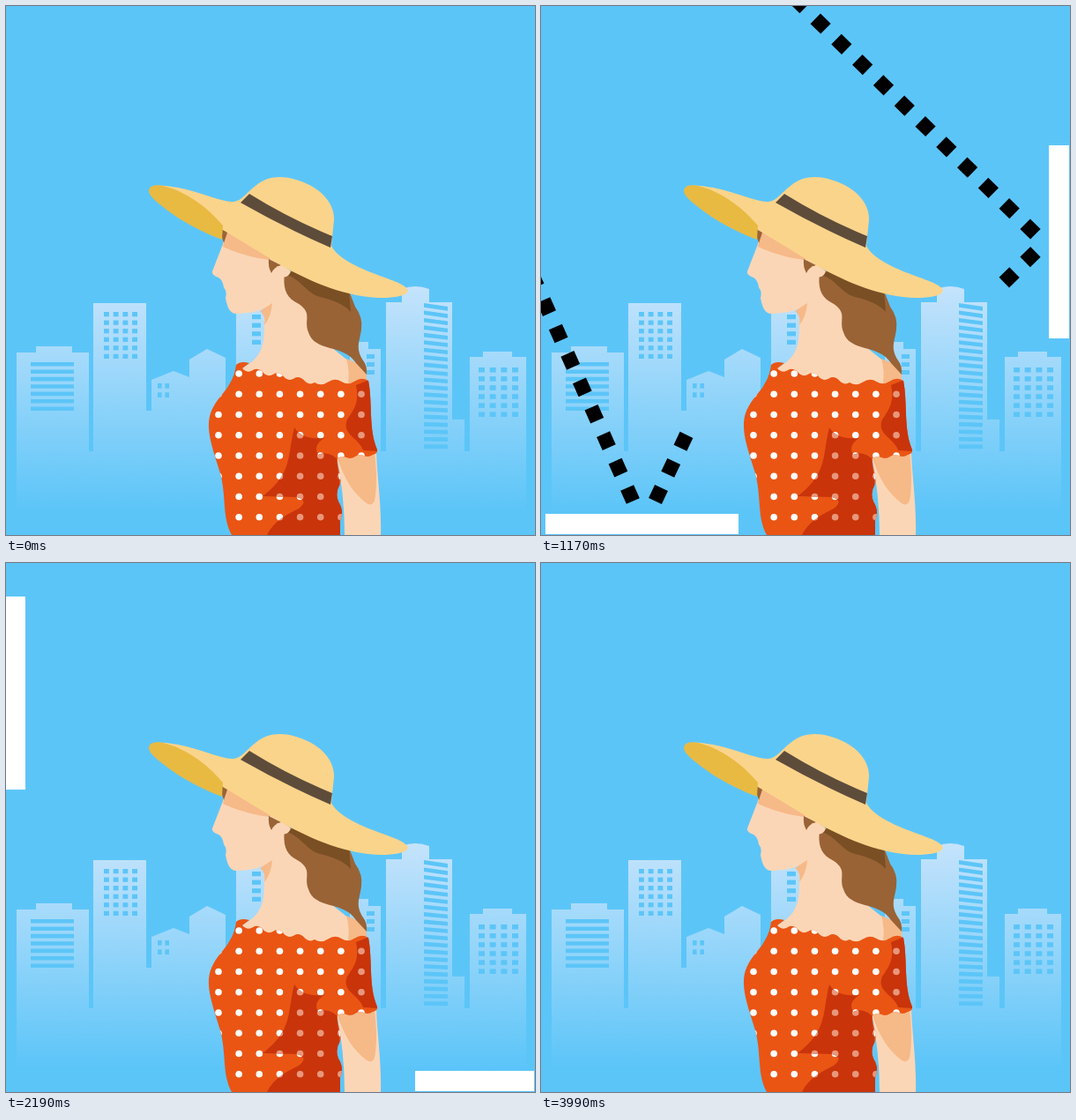
Write an HTML page that moves like this. It is 600 px wide and 600 px high and loops after 4.5 s.

```html
<!DOCTYPE html>
<html lang="en">
<head>
<meta charset="utf-8">
<title>Summer light</title>
<style>
html, body { margin: 0; width: 100%; height: 100%; overflow: hidden; background: #5cc5f8; }
svg { display: block; width: 100vw; height: 100vh; }
</style>
</head>
<body>
<svg viewBox="0 0 600 600" xmlns="http://www.w3.org/2000/svg">
  <defs>
    <linearGradient id="haze" gradientUnits="userSpaceOnUse" x1="0" y1="318" x2="0" y2="572">
      <stop offset="0" stop-color="#c5e3fc"/>
      <stop offset="1" stop-color="#5cc5f8"/>
    </linearGradient>
    <clipPath id="dressClip"><path id="dress"/></clipPath>
    <clipPath id="shadeClip">
      <path id="shade" d="M327 478 C334 490 348 491 361 490 C352 496 350 502 354 509 Q364 504 375 513 L385 600 H296 C303 585 318 577 332 570 Q344 561 330 557 L291 556 C326 530 319 508 327 478Z M397 430 L412 424 L421 505 L405 504 C401 490 380 486 387 469 C398 454 400 446 397 430Z"/>
    </clipPath>
  </defs>

  <rect width="600" height="600" fill="#5cc5f8"/>

  <g id="city">
    <path fill="url(#haze)" d="M12 572V393H34V386H75V393H94V505H99V337H159V459H165V424L190 414L208 421V401L228 389L249 399V505H261V330H300V505H390V381H411V389H425V505H431V336H449V321Q464 315 480 321V336H506V469H520V505H526V398H541V392H574V398H590V572Z"/>
    <g id="panes" fill="#5cc5f8"/>
  </g>

  <g id="woman">
    <path fill="#fbd6b6" d="M375 510 L420 506 C421 535 426 565 425 600 H384 Q384 555 375 510Z"/>
    <path fill="#f6b988" d="M375 510 L418 507 Q422 540 418 561 Q415 568 409 564 C394 553 383 536 375 510Z"/>
    <path fill="#fbd6b6" d="M248 250 L246 270 L234 301 Q233 305 241 308 Q246 311 247 319 Q251 324 249 331 C251 342 254 350 264 349 C276 348 284 347 292 343 C295 385 292 398 266 412 L275 440 H408 V418 L360 380 L322 300Z"/>
    <path fill="#f6b988" d="M250 254 L303 286 L298 288 Q270 284 246 273Z"/>
    <path fill="#996336" d="M245 249 L252 254 L247 269 Q243 259 245 249Z"/>
    <path fill="#f6b988" d="M302 337 L288 346 Q295 351 293 362 Q301 352 302 337Z"/>
    <path fill="#f6b988" d="M386 400 L409 410 V428 H388 Q390 414 386 400Z"/>
    <path fill="#996336" d="M316 303 C314 318 317 329 327 335 C350 347 337 355 343 370 C350 393 383 383 397 405 L409 418 Q410 408 405 402 C396 388 401 381 403 367 Q405 353 396 341 L389 323 L330 298Z"/>
    <path fill="#7a4f24" d="M318 305 C335 310 341 326 356 330 Q382 336 391 347 L389 323 L330 298Z"/>
    <path fill="#996336" d="M298 287 L312 294 Q304 296 301 303 Q297 296 298 287Z"/>
    <path fill="#fbd6b6" d="M307 295 L323 301 Q320 309 313 307Z"/>
    <path fill="#fad48b" d="M164 206 C169 202 188 204 208 209 C228 214 244 222 258 222 C268 221 273 211 283 204 C300 189 323 193 342 202 C363 212 373 228 372 243 L369 272 C377 288 405 299 427 307 C440 312 454 316 456 323 C454 329 440 331 426 331 C385 330 349 314 317 297 L246 254Z"/>
    <path fill="#e8ba42" d="M162 209 C163 203 172 202 182 205 C207 212 230 230 246 249 L245 265 C221 256 195 242 177 227 Q161 215 162 209Z"/>
    <path fill="#5e4c3b" d="M266 223 L276 213 Q321 241 370 261 L368 274 Q317 252 266 223Z"/>
    <use href="#dress" fill="#ea5514"/>
    <g id="dots" fill="#fff" clip-path="url(#dressClip)"/>
    <g clip-path="url(#dressClip)">
      <use href="#shade" fill="#c9340b"/>
      <g id="dimDots" fill="#e8977b" clip-path="url(#shadeClip)"/>
    </g>
  </g>

  <g id="first">
    <path fill="#fff" d="M576 158H599V377H576Z M5 576H224V599H5Z"/>
  </g>
  <g id="second">
    <path fill="#fff" d="M0 38H22V257H0Z M464 576H599V599H464Z"/>
  </g>
</svg>
<script>
const LOOP = 4500, TICK = 30;
const STEP = 82;      // ms between marks
const PITCH = 33.3;   // distance between marks
const $ = id => document.getElementById(id);

function add(parent, tag, attrs) {
  const el = document.createElementNS("http://www.w3.org/2000/svg", tag);
  for (const k in attrs) el.setAttribute(k, attrs[k]);
  parent.appendChild(el);
  return el;
}

// Fills a box with evenly spaced panes; tilt slants the upper rows.
function windows(x, y, w, h, cols, rows, tilt = 0) {
  const fill = 0.55, dx = w / (cols - 1 + fill), dy = h / (rows - 1 + fill);
  for (let c = 0; c < cols; c++)
    for (let r = 0; r < rows; r++) {
      const drop = tilt * (1 - r / rows);
      add($("panes"), "path", {
        d: `M${x + c * dx} ${y + r * dy}l${dx * fill} ${drop}v${dy * fill}l${-dx * fill} ${-drop}Z`
      });
    }
}
windows(28, 404, 49, 55, 1, 7);
windows(111, 347, 38, 53, 4, 6);
windows(172, 428, 13, 16, 2, 2);
windows(279, 350, 10, 34, 1, 4);
windows(409, 395, 9, 23, 1, 3);
windows(474, 337, 27, 165, 1, 20, 4);
windows(536, 410, 45, 56, 4, 6);

// A frilled edge: n curves that bulge to alternating sides.
function frill(x0, y0, x1, y1, n, depth) {
  let d = "";
  for (let i = 0; i < n; i++) {
    const at = k => [x0 + (x1 - x0) * k / n, y0 + (y1 - y0) * k / n];
    const [cx, cy] = at(i + 0.5), [x, y] = at(i + 1);
    d += `Q${cx} ${cy + (i % 2 ? -depth : depth)} ${x} ${y}`;
  }
  return d;
}
$("dress").setAttribute("d",
  "M261 407Q266 402 276 405L268 411" +
  frill(268, 411, 350, 427, 7, 5) + frill(350, 427, 411, 425, 4, 5) +
  "C416 450 411 480 421 503Q422 508 416 509" + frill(416, 509, 376, 513, 4, 3) +
  "C375 523 381 533 379 542Q373 552 377 562Q384 573 379 584V600H256" +
  "C245 580 250 556 243 530C228 483 223 467 244 442Q259 425 261 407Z");

for (let x = 241; x < 420; x += 23.15)
  for (let y = 417; y < 600; y += 23.25)
    for (const id of ["dots", "dimDots"])
      add($(id), "circle", { cx: x, cy: y, r: 3.8 });

// A dashed arrow that runs in to one point, bounces and leaves from another.
// Its marks pop on one by one, the head last.
const marks = [];
function arrow(parent, time, inward, outward) {
  const place = (d, leg, i) => {
    const a = leg.angle * Math.PI / 180;
    const x = leg.x + Math.cos(a) * PITCH * i, y = leg.y + Math.sin(a) * PITCH * i;
    const el = add(parent, "path", { d, transform: `translate(${x} ${y}) rotate(${leg.angle})` });
    marks.push({ el, time });
    time += STEP;
  };
  const square = "M-8.2-8.2H8.2V8.2H-8.2Z", head = "M66.6 0L23.6-22.8V22.8Z";
  for (let i = 1 - inward.n; i <= 0; i++) place(square, inward, i);
  for (let i = 0; i < outward.n; i++) place(square, outward, i);
  place(head, outward, outward.n - 1);
}
const leg = (x, y, angle, n) => ({ x, y, angle, n });
arrow($("first"), 102, leg(555, 253, 44.4, 12), leg(555, 284.7, 135.7, 4));
arrow($("first"), 236, leg(101, 554, 66, 9), leg(133, 554, -64.7, 5));
arrow($("second"), 2700, leg(43, 127, 135.8, 6), leg(42, 160, 44.5, 4));
arrow($("second"), 2950, leg(558.5, 552, 129.6, 3), leg(526, 552, -129.6, 3));

const ramp = (t, a, b) => Math.min(1, Math.max(0, (t - a) / (b - a)));
const fade = (t, on, off) => ramp(t, on, on + 105) * (1 - ramp(t, off, off + 170));

function draw(now) {
  const t = Math.floor(now % LOOP / TICK) * TICK;
  $("first").setAttribute("opacity", fade(t, 15, 1720));
  $("second").setAttribute("opacity", fade(t, 2085, 3820));
  for (const m of marks) m.el.setAttribute("visibility", t >= m.time ? "visible" : "hidden");
}

const begin = performance.now();
function loop() {
  draw(performance.now() - begin);
  requestAnimationFrame(loop);
}
loop();
</script>
</body>
</html>
```
